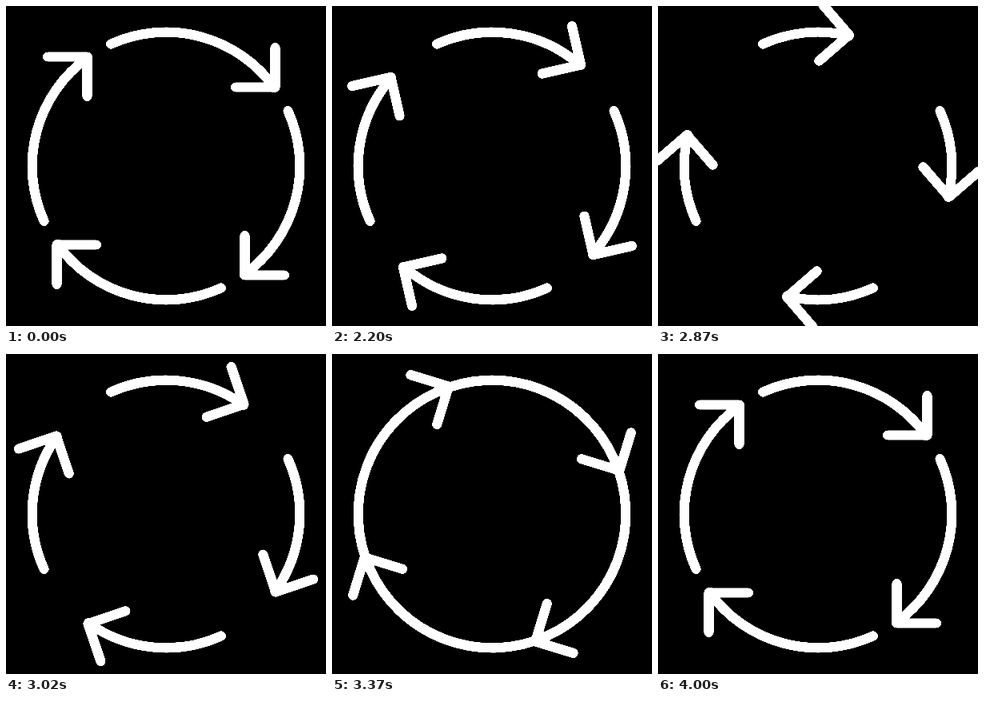
Write an HTML page with a canvas that moves like this. It is 400 by 400 pixels and loops after 4020 ms.

```html
<!DOCTYPE html>
<html lang="en">
<head>
<meta charset="utf-8">
<title>Cycle arrows</title>
<style>
html, body { margin: 0; width: 100%; height: 100%; overflow: hidden; background: #000; }
canvas { display: block; width: 400px; height: 400px; filter: contrast(5); }
</style>
</head>
<body>
<canvas id="stage" width="400" height="400"></canvas>
<script>
const ctx = document.getElementById('stage').getContext('2d');
const LOOP = 4020;
const RADIUS = 167.3;
const TAIL = -24.3;
const TIP = { x: 136.5, y: -98.5 };
const ARM = 49.5;
const REST = Math.atan2(TIP.x, -TIP.y) * 180 / Math.PI;

// Swing of the arrowheads around the ring: [time in ms, degrees from rest]
const SWING = [
  [0, 0],
  [2000, 0],
  [2653, -57.2],
  [3372, 17],
  [3608, -10.1],
  [4000, 0],
  [LOOP, 0]
];

const rad = deg => deg * Math.PI / 180;
const ease = p => p * p * (3 - 2 * p);

function swingAt(t) {
  const i = SWING.findIndex(key => key[0] > t);
  const [t0, a0] = SWING[i - 1];
  const [t1, a1] = SWING[i];
  return a0 + (a1 - a0) * ease((t - t0) / (t1 - t0));
}

function drawArrow(swing) {
  ctx.beginPath();
  ctx.arc(0, 0, RADIUS, rad(TAIL - 90), rad(REST + swing - 90));
  ctx.stroke();

  ctx.save();
  ctx.rotate(rad(swing));
  ctx.beginPath();
  ctx.moveTo(TIP.x - ARM, TIP.y);
  ctx.lineTo(TIP.x, TIP.y);
  ctx.lineTo(TIP.x, TIP.y - ARM);
  ctx.stroke();
  ctx.restore();
}

function draw(t) {
  const swing = swingAt(t);
  ctx.setTransform(1, 0, 0, 1, 0, 0);
  ctx.fillStyle = '#000';
  ctx.fillRect(0, 0, 400, 400);
  ctx.strokeStyle = '#fff';
  ctx.lineWidth = 12.2;
  ctx.lineCap = ctx.lineJoin = 'round';
  ctx.translate(200, 200);
  for (let i = 0; i < 4; i++) {
    drawArrow(swing);
    ctx.rotate(Math.PI / 2);
  }
}

const start = performance.now();

function tick() {
  draw((performance.now() - start) % LOOP);
  requestAnimationFrame(tick);
}

tick();
</script>
</body>
</html>
```
